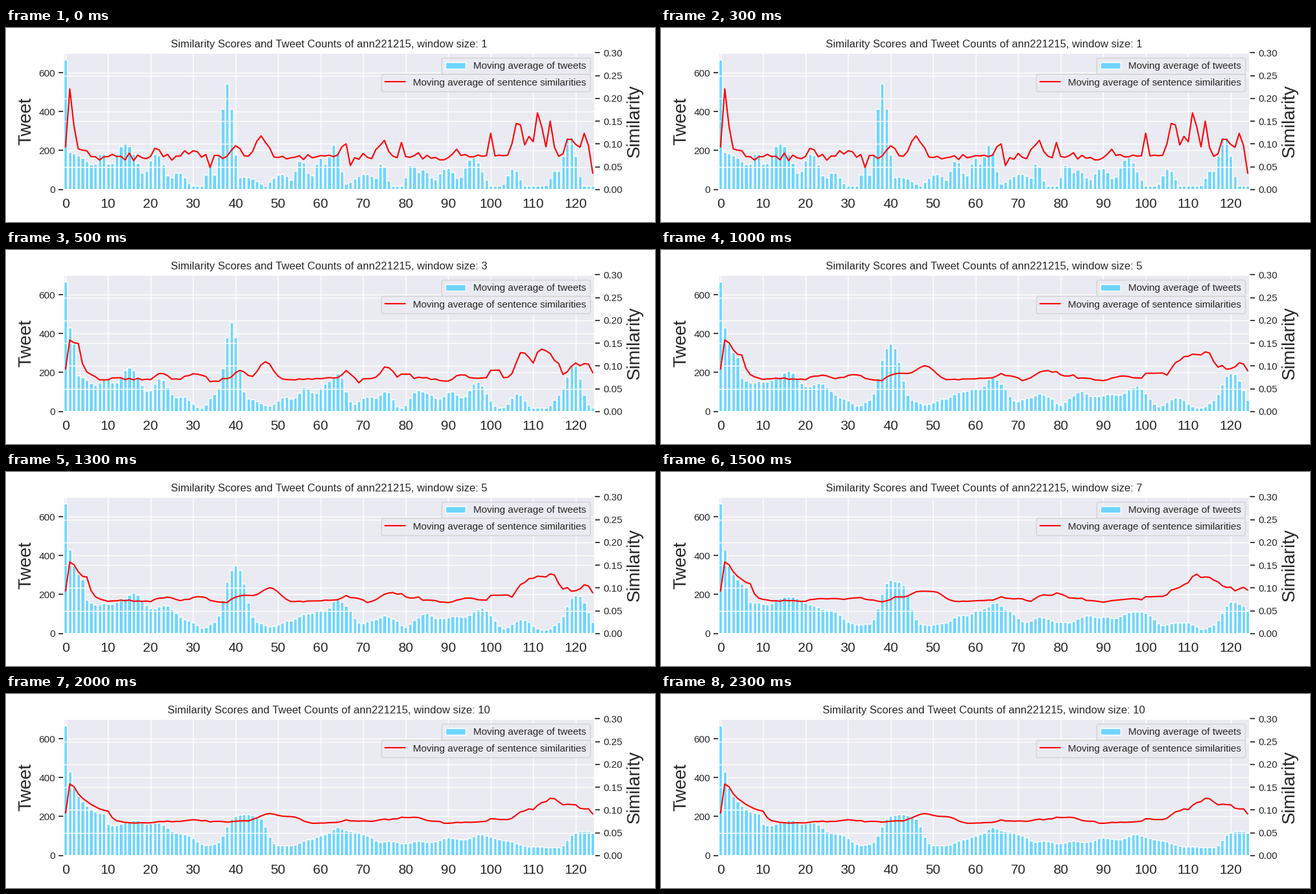
Animation of 1000x300 px, one loop 2.5 s. Source, as a matplotlib script:

```python
import numpy as np
import matplotlib.pyplot as plt
from matplotlib.animation import FuncAnimation

WINDOWS = (1, 3, 5, 7, 10)
WIDTH, HEIGHT, DPI = 1000, 300, 100
LEFT, RIGHT, BOTTOM, TOP = 89.1, 906.7, 50.3, 261.5
INK = "#262626"
DAYS = np.arange(125)

plt.rcParams.update({
    "font.family": "Liberation Sans",
    "font.size": 12,
    "text.color": INK,
    "axes.labelcolor": INK,
    "axes.facecolor": "#eaeaf2",
    "axes.edgecolor": "white",
    "axes.linewidth": 1.25,
    "axes.axisbelow": True,
    "axes.grid": True,
    "axes.titlesize": 12,
    "grid.color": "white",
    "grid.linewidth": 1,
    "legend.fontsize": 11,
    "patch.linewidth": 1,
    "lines.solid_capstyle": "round",
})
for side in ("xtick", "ytick"):
    plt.rcParams.update({
        f"{side}.color": INK,
        f"{side}.labelsize": 11,
        f"{side}.major.size": 6,
        f"{side}.major.width": 1.25,
    })


def bumps(*peaks):
    """One bell curve over the days for each (day, height, spread)."""
    return np.array([height * np.exp(-((DAYS - day) / spread) ** 2)
                     for day, height, spread in peaks])


def moving_average(values, window):
    """Trailing mean that uses a shorter window at the start."""
    return [values[max(0, i + 1 - window):i + 1].mean() for i in range(len(values))]


# Tweets come in bursts over a quiet floor; the strongest burst wins.
tweets = np.maximum(18, bumps(
    (0, 668, 0.5), (0, 195, 9.2), (8.5, 190, 2.5), (14, 235, 4),
    (21.3, 185, 2.8), (26.5, 88, 2.5), (34, 115, 1.5), (38, 545, 1.9),
    (42, 66, 4.5), (50.8, 80, 3.2), (55.4, 150, 2.1), (60, 162, 2.2),
    (63.1, 230, 2), (70.5, 80, 4), (74.4, 140, 1.5), (81.4, 132, 1.6),
    (84, 102, 2.8), (89.6, 110, 3), (95.8, 165, 2.9), (105.3, 108, 2),
    (115.5, 103, 2), (118.5, 285, 2.1),
).max(axis=0))

# Similarity jitters around a steady level, with peaks and a few dips.
jitter = np.random.default_rng(4).normal(0, 0.004, len(DAYS))
similarities = 0.071 + jitter + bumps(
    (1.15, 0.155, 0.85), (4, 0.022, 1.5), (21.3, 0.024, 1), (29.5, 0.016, 2.5),
    (34, -0.024, 0.5), (40, 0.022, 1.7), (45.9, 0.048, 1.8), (66, 0.036, 1.4),
    (67, -0.045, 0.6), (74.7, 0.034, 1.5), (79, 0.040, 0.7), (91.8, 0.018, 1.2),
    (100, 0.053, 0.6), (106.4, 0.084, 1.3), (109, 0.038, 1), (111.3, 0.105, 1),
    (114, 0.080, 0.8), (118.7, 0.048, 1.4), (122, 0.052, 1), (124, -0.045, 0.6),
).sum(axis=0)

fig = plt.figure(figsize=(WIDTH / DPI, HEIGHT / DPI), dpi=DPI, facecolor="white")
ax = fig.add_axes([LEFT / WIDTH, BOTTOM / HEIGHT,
                   (RIGHT - LEFT) / WIDTH, (TOP - BOTTOM) / HEIGHT])
bars = ax.bar(DAYS, tweets, width=0.8, color="#6dd5ff", edgecolor="white",
              label="Moving average of tweets")
ax.set_xlim(-0.4, len(DAYS) - 0.6)
ax.set_ylim(0, tweets.max() * 1.05)
ax.set_xticks(range(0, 121, 10))
ax.set_yticks(range(0, 601, 200))
ax.tick_params(axis="x", bottom=False, labelsize=15)
ax.set_ylabel("Tweet", fontsize=20)

ax2 = ax.twinx()
line, = ax2.plot(DAYS, similarities, color="red", lw=1.5,
                 label="Moving average of sentence similarities")
ax2.set_ylim(0, 0.3)
ax2.set_ylabel("Similarity", fontsize=20, labelpad=4.5)

ax.legend(loc="upper right", bbox_to_anchor=(1.001, 1))
ax2.legend(loc="upper right", bbox_to_anchor=(1.001, 0.88))
title = ax.set_title("")


def update(frame):
    window = WINDOWS[frame]
    for bar, height in zip(bars, moving_average(tweets, window)):
        bar.set_height(height)
    line.set_ydata(moving_average(similarities, window))
    title.set_text("Similarity Scores and Tweet Counts of ann221215, "
                   f"window size: {window}")
    return [*bars, line, title]


animation = FuncAnimation(fig, update, frames=len(WINDOWS), interval=500,
                          repeat=True, repeat_delay=0)
plt.show()
```
